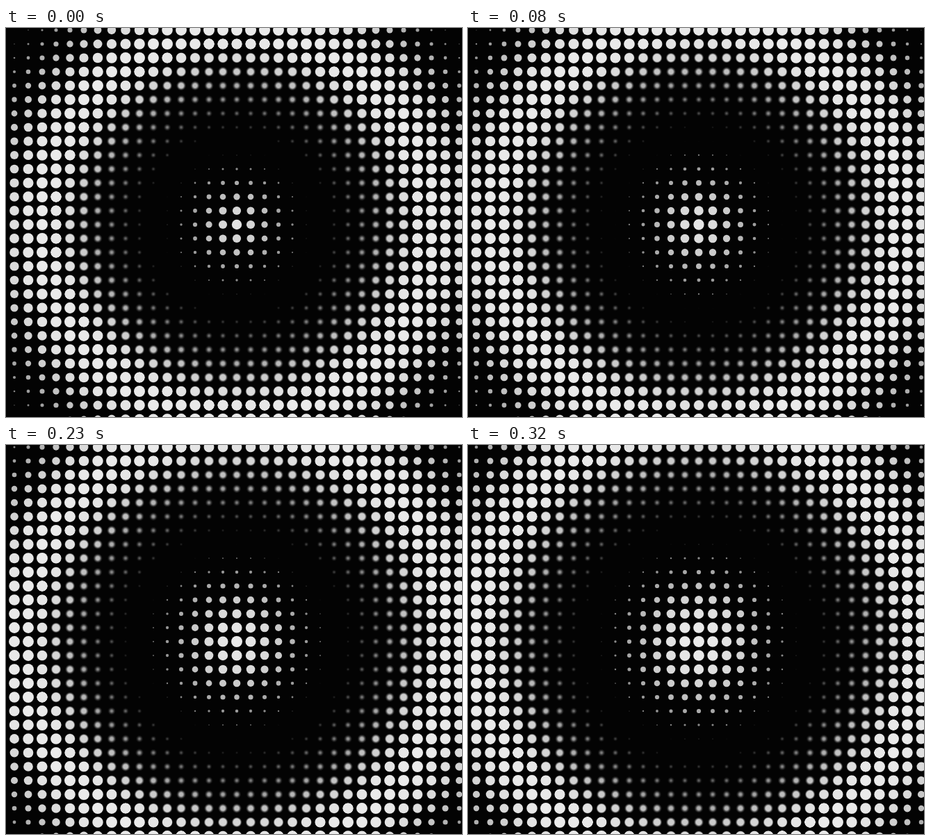
Animation of 656x560 px, one loop 340 ms. Source, as an HTML page with a canvas:

```html
<!DOCTYPE html>
<html lang="en">
<head>
<meta charset="utf-8">
<title>Dot ripple</title>
<style>
  html, body { margin: 0; width: 100%; height: 100%; overflow: hidden; background: #030303; }
  canvas { display: block; }
</style>
</head>
<body>
<canvas id="stage" width="656" height="560"></canvas>
<script>
const ctx = document.getElementById('stage').getContext('2d');
const LOOP = 340;
const STEPS = [30, 80, 130, 180, 230, 270, 320];
const PITCH = 20, COLS = 16, ROWS = 14;
const CX = 332, CY = 283;
const MAX_R = 8;
const FREQ = 0.02;        // radians per pixel
const TROUGH = 123.5;     // radius of the first dark ring at the start
const SPEED = 5.7;        // pixels the wave travels per step

const white = a => `rgba(234,234,234,${a})`;

function disc(x, y, r, fill) {
  ctx.fillStyle = fill;
  ctx.beginPath();
  ctx.arc(x, y, r, 0, Math.PI * 2);
  ctx.fill();
}

// Dots ahead of the crest grow with a crisp edge.
function crispDot(x, y, v) {
  disc(x, y, MAX_R * v ** 0.9, white(v ** 0.3));
}

// Dots behind the crest melt away from the rim inwards.
function softDot(x, y, v) {
  const outer = 8.2 * v ** 0.25;
  const inner = Math.min(7.9 * v * v, outer - 0.3);
  const alpha = v ** 0.4;
  const glow = ctx.createRadialGradient(x, y, inner, x, y, outer);
  glow.addColorStop(0, white(alpha));
  glow.addColorStop(0.25, white(alpha * 0.76));
  glow.addColorStop(0.5, white(alpha * 0.38));
  glow.addColorStop(0.75, white(alpha * 0.12));
  glow.addColorStop(1, white(0));
  disc(x, y, outer, glow);
}

function draw(time) {
  const step = STEPS.filter(s => s <= time).length;
  const trough = TROUGH + SPEED * step;
  ctx.fillStyle = '#030303';
  ctx.fillRect(0, 0, 656, 560);
  for (let j = -ROWS; j <= ROWS; j++) {
    for (let i = -COLS; i <= COLS; i++) {
      const phase = (Math.hypot(i, j) * PITCH - trough) * FREQ;
      const v = (1 - Math.cos(phase)) / 2;
      if (v < 0.004) continue;
      const dot = Math.sin(phase) > 0 && v < 0.98 ? softDot : crispDot;
      dot(CX + i * PITCH, CY + j * PITCH, v);
    }
  }
}

const start = performance.now();
function tick() {
  draw((performance.now() - start) % LOOP);
  requestAnimationFrame(tick);
}
tick();
</script>
</body>
</html>
```
